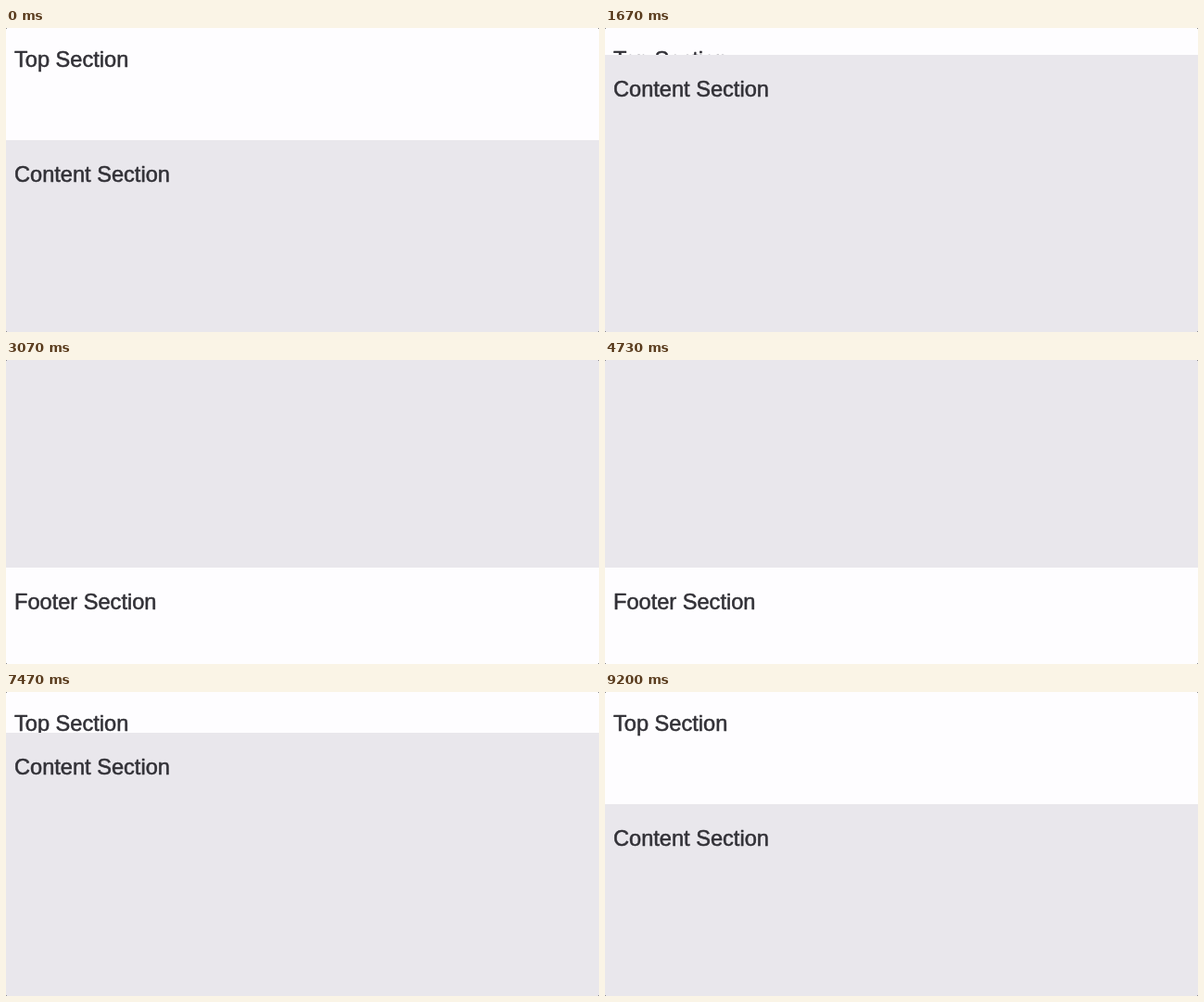
Animation of 640 by 328 pixels, one loop 9270 ms. Source, as an HTML page with a canvas:

```html
<!DOCTYPE html>
<html lang="en">
<head>
<meta charset="utf-8">
<title>Sliding sections</title>
<style>
  html, body { margin: 0; width: 100%; height: 100%; overflow: hidden; background: #fefdff; }
  canvas { display: block; }
</style>
</head>
<body>
<canvas id="stage" width="640" height="328"></canvas>
<script>
const W = 640, H = 328;
const LOOP = 9270, FRAME = 1000 / 15;
const TOP_HEIGHT = 121, FOOTER_TOP = 224, HEADING_BASELINE = 45;
const PAPER = '#fefdff', CONTENT = '#e9e7ec', INK = '#323137', CORNER = '#8c8b90';

// Scroll position in pixels over time in ms
const scrollKeys = [
  [730, 0], [1070, 20], [1670, 92], [2270, 175], [2600, 204], [3130, 225],
  [5870, 225], [6270, 218], [6870, 176], [7200, 125], [7470, 77], [8000, 18], [8470, 0]
];

const ctx = document.getElementById('stage').getContext('2d');

function slope(i) {
  const a = scrollKeys[i - 1], b = scrollKeys[i], c = scrollKeys[i + 1];
  if (!a || !c) return 0;
  const before = (b[1] - a[1]) / (b[0] - a[0]);
  const after = (c[1] - b[1]) / (c[0] - b[0]);
  return before * after <= 0 ? 0 : 2 * before * after / (before + after);
}

function scrollAt(t) {
  const next = scrollKeys.findIndex(key => key[0] > t);
  if (next <= 0) return 0;
  const [t0, y0] = scrollKeys[next - 1], [t1, y1] = scrollKeys[next];
  const span = t1 - t0, u = (t - t0) / span, v = 1 - u;
  return y0 * v * v * (1 + 2 * u) + y1 * u * u * (3 - 2 * u)
    + span * u * v * (slope(next - 1) * v - slope(next) * u);
}

function box(color, x, y, w, h) {
  ctx.fillStyle = color;
  ctx.fillRect(x, y, w, h);
}

function heading(text, baseline) {
  ctx.fillStyle = ctx.strokeStyle = INK;
  ctx.fillText(text, 9, baseline);
  ctx.strokeText(text, 9, baseline);
}

function draw(t) {
  const contentTop = Math.round(TOP_HEIGHT - scrollAt(t));
  box(PAPER, 0, 0, W, H);
  heading('Top Section', 42);
  heading('Footer Section', FOOTER_TOP + HEADING_BASELINE);
  box(CONTENT, 0, contentTop, W, H);
  heading('Content Section', contentTop + HEADING_BASELINE);
  for (const x of [0, W - 1]) {
    for (const y of [0, H - 1]) box(CORNER, x, y, 1, 1);
  }
}

ctx.font = '23.6px "Liberation Sans", Arial, sans-serif';
ctx.lineWidth = 0.55;
ctx.lineJoin = 'round';

const start = performance.now();
function tick() {
  const t = (performance.now() - start) % LOOP;
  draw(Math.floor((t + 4) / FRAME) * FRAME);
  requestAnimationFrame(tick);
}
tick();
</script>
</body>
</html>
```
